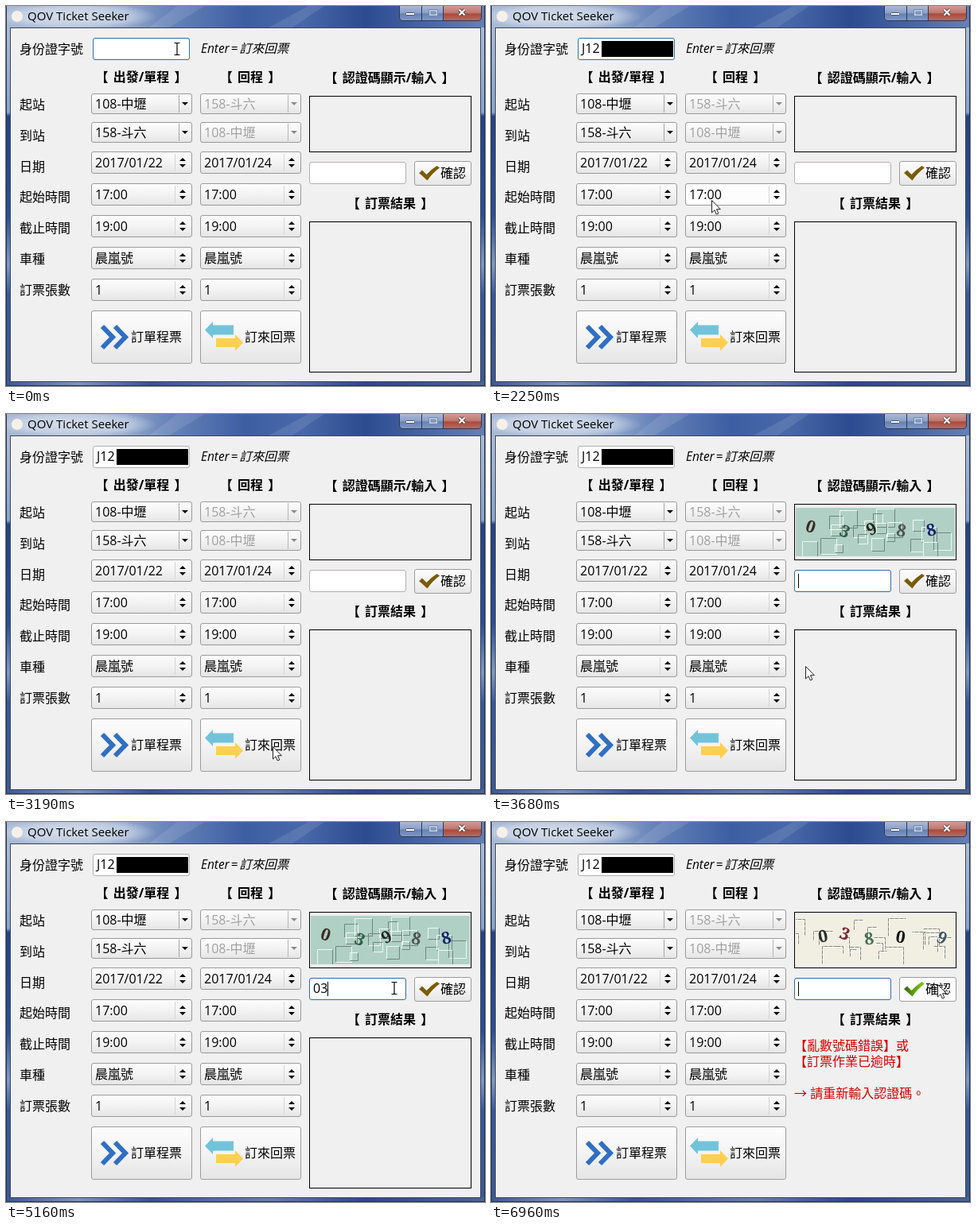
These frames come from a looping animation (602x478 px, 8 s). An HTML page:

```html
<!DOCTYPE html>
<html lang="zh-Hant">
<head>
<meta charset="utf-8">
<title>QOV Ticket Seeker</title>
<style>
html, body { margin: 0; width: 100%; height: 100%; overflow: hidden; background: #4a6ba6; }
svg { display: block; position: absolute; left: 0; top: 0; }
text { font: 16px "Open Sans", "Noto Sans", "Noto Sans CJK TC", "Noto Sans CJK", sans-serif; white-space: pre; }
.title { font-size: 15px; }
.hint { font-style: italic; font-size: 15.5px; }
.head { font-weight: 700; text-anchor: middle; word-spacing: 2px; }
.off { fill: #a0a0a0; }
.field { fill: url(#face); stroke: #9a9a9a; }
.field.hover { fill: #fdfdfd; }
.btn { fill: url(#face); stroke: #9c9c9c; }
.btn.hover { fill: #fcfcfc; }
.btn.down { fill: #e9e9e9; }
.entry { fill: #fff; stroke: #b4aeb0; }
.entry.focus { stroke: #2c6cad; }
.digit { font-weight: 700; font-size: 21px; font-family: "Noto Serif", "Liberation Serif", serif; text-anchor: middle; }
.err { fill: #d00000; }
</style>
</head>
<body>
<svg id="stage" width="602" height="478" viewBox="0 0 602 478">
  <defs>
    <linearGradient id="face" x2="0" y2="1">
      <stop stop-color="#fdfdfd"/><stop offset=".5" stop-color="#f3f3f3"/><stop offset="1" stop-color="#e5e5e5"/>
    </linearGradient>
    <linearGradient id="bar">
      <stop stop-color="#a9bad6"/><stop offset=".25" stop-color="#93a9cd"/><stop offset=".33" stop-color="#6a86ba"/>
      <stop offset=".5" stop-color="#3d5ea2"/><stop offset=".62" stop-color="#4868a8"/><stop offset=".75" stop-color="#2c4b90"/>
      <stop offset="1" stop-color="#6480b5"/>
    </linearGradient>
    <linearGradient id="side" x2="0" y2="1">
      <stop stop-color="#b4c4de"/><stop offset=".15" stop-color="#9db3d6"/><stop offset=".28" stop-color="#88a4d0"/>
      <stop offset=".29" stop-color="#244488"/><stop offset=".55" stop-color="#2b5099"/><stop offset=".68" stop-color="#7f9bc9"/>
      <stop offset=".76" stop-color="#36599f"/><stop offset="1" stop-color="#3c5a94"/>
    </linearGradient>
    <linearGradient id="foot">
      <stop stop-color="#3c5a94"/><stop offset=".15" stop-color="#7c94bf"/><stop offset=".3" stop-color="#365695"/>
      <stop offset=".55" stop-color="#6780b0"/><stop offset=".75" stop-color="#2b4a8c"/><stop offset="1" stop-color="#4a6696"/>
    </linearGradient>
    <linearGradient id="shine" x2="0" y2="1">
      <stop stop-color="#fff" stop-opacity=".45"/><stop offset=".5" stop-color="#fff" stop-opacity=".25"/>
      <stop offset=".52" stop-color="#fff" stop-opacity="0"/><stop offset="1" stop-color="#fff" stop-opacity=".2"/>
    </linearGradient>
    <linearGradient id="lit">
      <stop stop-color="#35600f"/><stop offset=".45" stop-color="#5c9c10"/><stop offset="1" stop-color="#86c81c"/>
    </linearGradient>
    <radialGradient id="glow">
      <stop stop-color="#fff" stop-opacity=".6"/><stop offset=".7" stop-color="#fff" stop-opacity=".35"/>
      <stop offset="1" stop-color="#fff" stop-opacity="0"/>
    </radialGradient>
    <clipPath id="pic"><rect x="383" y="118" width="200" height="61"/></clipPath>
  </defs>
</svg>
<script>
const LOOP = 8000;
const stage = document.getElementById("stage");
const $ = id => document.getElementById(id);

const text = (x, y, s, cls = "", extra = "") => `<text x="${x}" y="${y}" class="${cls}" ${extra}>${s}</text>`;
const box = (x, y, w, h, attr = "") => `<rect x="${x}" y="${y}" width="${w}" height="${h}" ${attr}/>`;
const path = (d, attr = "") => `<path d="${d}" ${attr}/>`;
const frame = (x, y, w, h, cls, id = "") =>
  box(x + .5, y + .5, w - 1, h - 1, `rx="2.500" class="${cls}" id="${id}"`);

function windowFrame() {
  const cross = "M569.500 4.500L576.500 11.500M576.500 4.500L569.500 11.500";
  return box(0, 0, 602, 478, 'fill="url(#side)"')
    + box(0, 0, 602, 27, 'fill="url(#bar)"')
    + box(0, 472, 602, 6, 'fill="url(#foot)"')
    + path("M180 27L215 0H250L205 27ZM330 27L380 0H400L360 27Z", 'fill="#fff" opacity=".1"')
    + '<ellipse cx="88" cy="13" rx="102" ry="17" fill="url(#glow)"/>'
    + box(.5, -1, 601, 478.5, 'fill="none" stroke="#26304a"')
    + box(5.5, 27.5, 591, 445, 'fill="#f0f0f0" stroke="#3a4458"')
    + '<circle cx="14" cy="13" r="7" fill="#f6f1e8"/>'
    + text(27, 18, "QOV Ticket Seeker", "title")
    + path("M494.500 0V14Q494.500 18.500 499 18.500H549V0Z", 'fill="#6480b4"')
    + path("M549 0V18.500H593Q597.500 18.500 597.500 14V0Z", 'fill="#a8493c"')
    + path("M494.500 0V14Q494.500 18.500 499 18.500H593Q597.500 18.500 597.500 14V0M522.500 0V18M549.500 0V18",
      'fill="url(#shine)" stroke="#2b3858"')
    + box(502.5, 8.5, 11, 3, 'rx="1" fill="#fff" stroke="#4a5670"')
    + path("M531.500 4.500H542.500V12.500H531.500ZM534 7V10H540V7Z",
      'fill="#c3cfe2" fill-rule="evenodd" stroke="#7187ae"')
    + path(cross, 'stroke="#5c3a3a" stroke-width="4"')
    + path(cross, 'stroke="#fff" stroke-width="2.200"');
}

function combo(x, y, s, off) {
  const c = y + 13;
  return frame(x, y, 127, 26, "field")
    + path(`M${x + 110.5} ${y + 2}V${y + 24}`, `stroke="${off ? "#b5b5b5" : "#a5a5a5"}"`)
    + path(`M${x + 114} ${c - 2}h8l-4 4z`, `fill="${off ? "#8c8c8c" : "#000"}"`)
    + text(x + 5, c + 6, s, off ? "off" : "");
}

function spin(x, y, s) {
  const c = y + 14;
  return frame(x, y, 127, 28, "field spin")
    + path(`M${x + 105.5} ${y + 3}V${y + 25}`, 'stroke="#d4d4d4"')
    + path(`M${x + 111} ${c - 2}h8l-4 -4zM${x + 111} ${c + 2}h8l-4 4z`)
    + text(x + 5, c + 6, s);
}

function form() {
  const labels = ["起站", "到站", "日期", "起始時間", "截止時間", "車種", "訂票張數"];
  let s = text(17, 60, "身份證字號");
  labels.forEach((l, i) => s += text(17, 130 + Math.round(i * 38.8), l));
  s += text(245, 59, 'Enter<tspan dx="2">=</tspan><tspan dx="2">訂來回票</tspan>', "hint");
  s += text(170, 95, "【 出發/單程 】", "head") + text(307, 95, "【 回程 】", "head")
    + text(482, 96, "【 認證碼顯示/輸入 】", "head") + text(483, 254, "【 訂票結果 】", "head");
  const stops = ["108-中壢", "158-斗六"];
  [107, 244].forEach((x, k) => {
    s += combo(x, 110, stops[k], k) + combo(x, 146, stops[1 - k], k);
    [k ? "2017/01/24" : "2017/01/22", "17:00", "19:00", "晨嵐號", "1"]
      .forEach((v, i) => s += spin(x, 183 + i * 40, v));
  });
  return s;
}

function buttons() {
  return frame(107, 383, 127, 67, "btn") + frame(244, 383, 127, 67, "btn", "round")
    + path("M121 403L134 416.500L121 430M137 403L150 416.500L137 430", 'fill="none" stroke="#2f6fc4" stroke-width="6"')
    + text(157, 422, "訂單程票")
    + path("M250 407.500L260 397V401.500H286V413.500H260V418Z", 'fill="#72c3da"')
    + path("M298 423.500L288 413V418H264V429H288V434Z", 'fill="#ffd04e"')
    + text(300, 422, "訂來回票")
    + frame(513, 195, 72, 31, "btn", "ok")
    + path("M519 210L523 206.500L528.500 212Q535 205 541.500 201L545 203.500Q536 210 529.500 219.500Z", 'id="tick"')
    + text(546, 216, "確認");
}

function digits(str, spots) {
  return spots.map(([x, y, r, c], i) =>
    text(0, 8, str[i], "digit", `fill="${c}" transform="translate(${x} ${y}) rotate(${r})"`)).join("");
}

function greenPic() {
  const squares = [[425, 128, 17], [438, 121, 22], [484, 119, 23], [480, 125, 12], [469, 134, 12], [427, 139, 14],
    [455, 140, 15], [484, 137, 13], [498, 136, 19], [414, 156, 20], [391, 160, 19], [432, 164, 10], [461, 151, 12],
    [478, 156, 16], [497, 150, 10], [527, 157, 16], [530, 133, 14], [541, 142, 19], [556, 149, 22], [543, 161, 18]];
  let s = box(383, 118, 200, 61, 'fill="#b0d0c5"');
  squares.forEach(([x, y, a], i) => {
    const c = i % 3 ? ["#eef8f4", "#71857f"] : ["#71857f", "#eef8f4"];
    s += path(`M${x + .5} ${y + a + .5}v${-a}h${a}`, `fill="none" stroke="${c[0]}"`)
      + path(`M${x + .5} ${y + a + .5}h${a}v${-a}`, `fill="none" stroke="${c[1]}"`);
  });
  return s + digits("03988", [[402, 141, 18, "#3a2a24"], [445, 147, 24, "#2f5a48"], [478, 144, -28, "#20241f"],
    [516, 146, 12, "#4c5350"], [553, 145, -14, "#15246b"]]);
}

function creamPic() {
  let seed = 11;
  const rnd = n => (seed = seed * 16807 % 2147483647) / 2147483647 * n | 0;
  let s = box(383, 118, 200, 61, 'fill="#f1efe2"');
  for (let i = 0; i < 22; i++) {
    const x = 386 + rnd(185) + .5, y = 120 + rnd(46) + .5, a = 9 + rnd(14), f = rnd(2) ? 1 : -1;
    s += path(`M${x} ${y + a}v${-a}h${a * f}`, 'fill="none" stroke="#84847a" stroke-dasharray="5 1"')
      + path(`M${x + f} ${y + a + 1}v${-a}h${a * f}`, 'fill="none" stroke="#fff"');
  }
  return s + digits("03809", [[417, 143, -12, "#27302a"], [445, 140, 20, "#7a2436"], [475, 146, -8, "#456b55"],
    [515, 144, 10, "#101510"], [567, 145, 24, "#3f5463"]]);
}

stage.innerHTML += windowFrame() + form()
  + frame(109, 40, 122, 28, "entry", "idBox") + text(114, 59, "", "", 'id="idText"')
  + frame(381, 196, 122, 28, "entry", "codeBox") + text(386, 215, "", "", 'id="codeText"')
  + buttons()
  + box(381.5, 113.5, 203, 70, 'fill="none" stroke="#000"')
  + `<g clip-path="url(#pic)"><g id="green">${greenPic()}</g><g id="cream">${creamPic()}</g></g>`
  + box(381.5, 271.5, 203, 189, 'id="result" fill="none" stroke="#000"')
  + `<g id="error">${text(381, 287, "【亂數號碼錯誤】或", "err")}${text(381, 307, "【訂票作業已逾時】", "err")}${text(381, 347, "→ 請重新輸入認證碼。", "err")}</g>`
  + box(0, 0, 1, 18, 'id="caret"')
  + '<circle id="click" r="12.500" fill="#2a9650" opacity=".7"/>'
  + path("M-3.500 -7.500H-1Q0 -7.500 0 -6.500Q0 -7.500 1 -7.500H3.500M0 -6.500V6.500M-3.500 7.500H-1Q0 7.500 0 6.500Q0 7.500 1 7.500H3.500",
    'id="beam" fill="none" stroke="#000" stroke-width="1.200"')
  + path("M.5 .5V16L4 12.700L6.300 18L8.800 17L6.500 11.700H11.300Z", 'id="arrow" fill="#fff" stroke="#222"')
  + box(139, 44, 90, 20, 'id="mask"');

// time, x, y of the pointer
const route = [[0, 215, 54], [2130, 215, 54], [2150, 215, 66], [2250, 277, 243], [2400, 318, 352], [2550, 332, 402],
  [2760, 335, 418], [3590, 335, 418], [3680, 395, 318], [3800, 452, 244], [3920, 481, 213], [4040, 488, 206],
  [4400, 488, 206], [4470, 488, 209], [6200, 488, 209], [6300, 530, 206], [6420, 561, 204], [LOOP, 561, 204]];

function pointer(t) {
  const i = Math.max(1, route.findIndex(k => k[0] > t));
  const [a, b] = [route[i - 1], route[i]];
  const u = (t - a[0]) / (b[0] - a[0]);
  return [a[1] + (b[1] - a[1]) * u, a[2] + (b[2] - a[2]) * u];
}

const at = (t, steps) => steps.reduce((v, [from, s]) => t >= from ? s : v, "");
const idSteps = [[820, "J"], [1200, "J1"], [1300, "J12"]];
const codeSteps = [[4790, "0"], [5160, "03"], [5450, "030"], [5610, "0300"], [5630, "030000"], [6960, ""]];
const clicks = [[320, 450], [2940, 3190], [4230, 4250], [6610, 6780]];
const within = (t, a, b) => t >= a && t < b;
const show = (id, on) => $(id).style.display = on ? "" : "none";
const inside = (x, y, r) => x >= r.x && x < r.x + r.width && y >= r.y && y < r.y + r.height;
const rectOf = el => ({ x: +el.getAttribute("x"), y: +el.getAttribute("y"),
  width: +el.getAttribute("width"), height: +el.getAttribute("height") });
const spins = [...document.querySelectorAll(".spin")].map(el => [el, rectOf(el)]);
const entries = ["idBox", "codeBox"].map(id => rectOf($(id)));
const okRect = rectOf($("ok"));

function draw(t) {
  const [x, y] = pointer(t);
  const beam = entries.some(r => inside(x, y, r));
  for (const id of ["beam", "arrow"])
    $(id).setAttribute("transform", `translate(${Math.round(x)} ${Math.round(y)})`);
  show("beam", beam);
  show("arrow", !beam);
  show("mask", t >= 1410);

  show("click", clicks.some(([a, b]) => within(t, a, b)));
  $("click").setAttribute("cx", x);
  $("click").setAttribute("cy", y);

  spins.forEach(([el, r]) => el.classList.toggle("hover", inside(x, y, r)));
  const overOk = inside(x, y, okRect);
  $("ok").classList.toggle("hover", overOk);
  $("ok").classList.toggle("down", within(t, 6630, 6780));
  $("tick").setAttribute("fill", overOk ? "url(#lit)" : "#7a5c08");
  $("round").classList.toggle("hover", within(t, 2940, 3190));

  const codeFocus = within(t, 3410, 6630) || t >= 6960;
  $("idBox").classList.toggle("focus", t < 2980);
  $("codeBox").classList.toggle("focus", codeFocus);
  $("idText").textContent = at(t, idSteps);
  $("codeText").textContent = at(t, codeSteps);
  const typingId = within(t, 820, 1410);
  show("caret", typingId || codeFocus);
  const label = $(typingId ? "idText" : "codeText");
  const start = typingId ? 114 : 386;
  $("caret").setAttribute("x", Math.round(start + (label.textContent ? label.getComputedTextLength() : 0)));
  $("caret").setAttribute("y", typingId ? 45 : 201);

  show("green", within(t, 3410, 6960));
  show("cream", t >= 6960);
  show("error", t >= 6960);
  show("result", t < 6960);
}

const begin = performance.now();
function tick() {
  draw((performance.now() - begin) % LOOP);
  requestAnimationFrame(tick);
}
tick();
</script>
</body>
</html>
```
